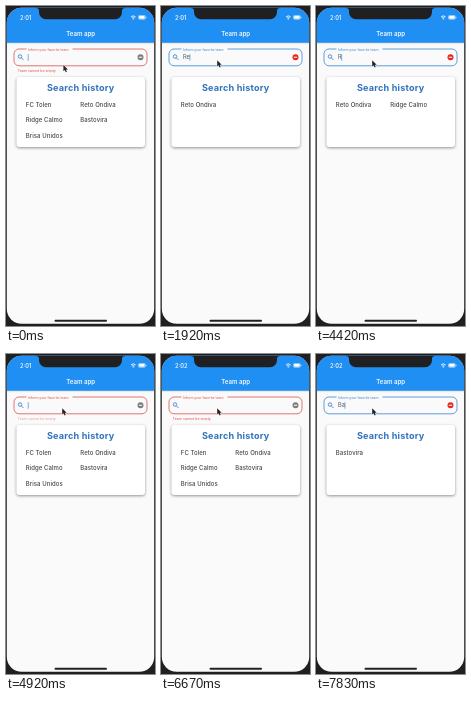
An HTML page with a canvas that plays this animation: 149x320 px, repeating every 8 s.

```html
<!DOCTYPE html>
<html lang="en">
<head>
<meta charset="utf-8">
<title>Team app</title>
<style>
html, body { margin: 0; width: 100%; height: 100%; overflow: hidden; background: #202022; }
canvas { display: block; width: 149px; height: 320px; }
</style>
</head>
<body>
<canvas id="stage"></canvas>
<script>
const W = 149, H = 320, LOOP = 8000;
const BLUE = [58, 134, 212], RED = [219, 84, 82], BEZEL = '#202022';
const TEAMS = ['FC Tolen', 'Reto Ondiva', 'Ridge Calmo', 'Bastovira', 'Brisa Unidos'];
// Time of each key press and the field's content after it
const KEYS = [[-670, ''], [1080, 'R'], [1670, 'Re'], [2790, 'R'], [3580, 'Ri'],
  [4290, 'R'], [4720, ''], [6870, 'B'], [7830, 'Ba']];

const canvas = document.getElementById('stage');
const c = canvas.getContext('2d');
const dpr = window.devicePixelRatio || 1;
canvas.width = W * dpr;
canvas.height = H * dpr;

const clamp = v => Math.max(0, Math.min(1, v));
const ramp = (t, from, to) => clamp((t - from) / (to - from));
const ease = v => 1 - (1 - v) ** 2;
const rgb = a => `rgb(${a.map(Math.round).join(',')})`;
const mix = (a, b, k) => rgb(a.map((v, i) => v + (b[i] - v) * k));

function rounded(x, y, w, h, r) {
  c.beginPath();
  c.roundRect(x, y, w, h, r);
}

function box(x, y, w, h, r, color) {
  rounded(x, y, w, h, r);
  c.fillStyle = color;
  c.fill();
}

function disc(x, y, r, color) {
  c.beginPath();
  c.arc(x, y, r, 0, Math.PI * 2);
  c.fillStyle = color;
  c.fill();
}

function text(s, x, y, size, weight, color, align = 'left', spacing = 0) {
  c.font = `${weight} ${size}px Inter, Roboto, sans-serif`;
  c.letterSpacing = `${spacing}px`;
  c.textAlign = align;
  c.fillStyle = color;
  c.fillText(s, x, y);
}

function shadow(color, blur, dy) {
  c.shadowColor = color;
  c.shadowBlur = blur * dpr;
  c.shadowOffsetY = dy * dpr;
}

function notch() {
  const left = 33, right = 116, top = 2, bottom = 13.2;
  c.beginPath();
  c.moveTo(left - 3, 0);
  c.lineTo(left - 3, top);
  c.arcTo(left, top, left, top + 3, 3);
  c.arcTo(left, bottom, left + 7, bottom, 7);
  c.arcTo(right, bottom, right, top, 7);
  c.arcTo(right, top, right + 3, top, 3);
  c.lineTo(right + 3, 0);
  c.fillStyle = BEZEL;
  c.fill();
}

function header(t) {
  c.save();
  shadow('rgba(0,0,0,.2)', 2, 0.5);
  box(0, 0, W, 36.7, 0, '#208ff3');
  c.restore();
  notch();
  text(t < 6420 ? '2:01' : '2:02', 14, 13.6, 5.7, 600, '#e4f1fd');
  text('Team app', 74.7, 30, 6.1, 600, '#f2f8fe', 'center');

  c.strokeStyle = '#fff';
  c.lineWidth = 0.9;
  for (const r of [1.6, 3.2]) {
    c.beginPath();
    c.arc(127.3, 13.2, r, -Math.PI * 0.75, -Math.PI * 0.25);
    c.stroke();
  }
  disc(127.3, 12.9, 0.6, '#fff');
  rounded(132.5, 9.5, 6.8, 3.8, 1);
  c.lineWidth = 0.5;
  c.stroke();
  box(133.1, 10.1, 5.6, 2.6, 0.6, '#fff');
  box(139.8, 10.7, 0.6, 1.4, 0.2, '#fff');
}

function caretAlpha(dt) {
  if (dt < 750) return 1;
  const phase = (dt - 750) % 1000;
  return phase < 500 ? 1 - ease(ramp(phase, 0, 200)) : ease(ramp(phase, 500, 700));
}

function field(t, typed, dt) {
  const err = t < 3000 ? 1 - ramp(t, 1180, 1380)
    : ramp(t, 4740, 4900) - ramp(t, 6900, 7080);
  const note = t < 3000 ? 1 - ramp(t, 1060, 1150)
    : ramp(t, 4780, 5040) - ramp(t, 6850, 6950);
  const color = mix(BLUE, RED, err);

  rounded(8, 43, 133, 16.8, 5);
  c.strokeStyle = color;
  c.lineWidth = 0.8;
  c.stroke();
  box(20.5, 42, 46, 2.2, 0, '#fafafa');
  text('Inform your favorite team', 22, 44.6, 3.4, 400, color);

  c.globalAlpha = note;
  text('Team cannot be empty', 11.8, 66.4, 3.5, 400, rgb(RED));
  c.globalAlpha = 1;

  // Search icon
  c.strokeStyle = '#3a8bdc';
  c.lineWidth = 0.9;
  c.beginPath();
  c.arc(14, 50.5, 1.75, 0, Math.PI * 2);
  c.moveTo(15.3, 51.8);
  c.lineTo(17.5, 54);
  c.stroke();

  text(typed, 22, 53.4, 5.6, 400, '#555');
  const caretX = 21.8 + c.measureText(typed).width;
  c.globalAlpha = caretAlpha(dt);
  box(caretX, 48, 0.7, 6.8, 0.35, '#3a8bdc');
  c.globalAlpha = 1;

  disc(134.5, 51.2, 3, typed ? '#e8261d' : '#7c7c7c');
  box(132.8, 50.75, 3.4, 0.9, 0, '#fff');
}

function card(typed) {
  c.save();
  shadow('rgba(0,0,0,.42)', 3, 1);
  box(10.5, 71, 128.5, 70, 3, '#fff');
  c.restore();
  text('Search history', 74.7, 84.7, 9.1, 700, '#2f72bd', 'center', 0.2);
  TEAMS.filter(name => name.startsWith(typed)).forEach((name, i) => {
    text(name, i % 2 ? 74.3 : 19.8, 100.5 + (i >> 1) * 15.5, 6, 500, '#484848', 'left', 0.06);
  });
}

function pointer(t) {
  const k = ramp(t, 80, 190);
  c.save();
  c.translate(57.4 - 1.2 * k, 59 - 4.8 * k);
  c.beginPath();
  c.moveTo(0, 0);
  for (const [x, y] of [[0, 6.2], [1.4, 5], [2.4, 7.2], [3.5, 6.7], [2.6, 4.6], [4.5, 4.5]]) c.lineTo(x, y);
  c.closePath();
  c.strokeStyle = '#fff';
  c.lineWidth = 0.8;
  c.stroke();
  c.fillStyle = '#222';
  c.fill();
  c.restore();
}

function draw(t) {
  const [pressed, typed] = KEYS.findLast(key => key[0] <= t);
  c.setTransform(dpr, 0, 0, dpr, 0, 0);
  box(0, 0, W, H, 0, BEZEL);
  c.save();
  rounded(0.8, 1.8, 147.4, 316, 15);
  c.clip();
  box(0, 0, W, H, 0, '#fafafa');
  header(t);
  field(t, typed, t - pressed);
  card(typed);
  box(48.5, 313.8, 52.5, 1.9, 0.95, '#222');
  c.restore();
  pointer(t);
}

const start = performance.now();
function tick() {
  draw((performance.now() - start) % LOOP);
  requestAnimationFrame(tick);
}
tick();
</script>
</body>
</html>
```
